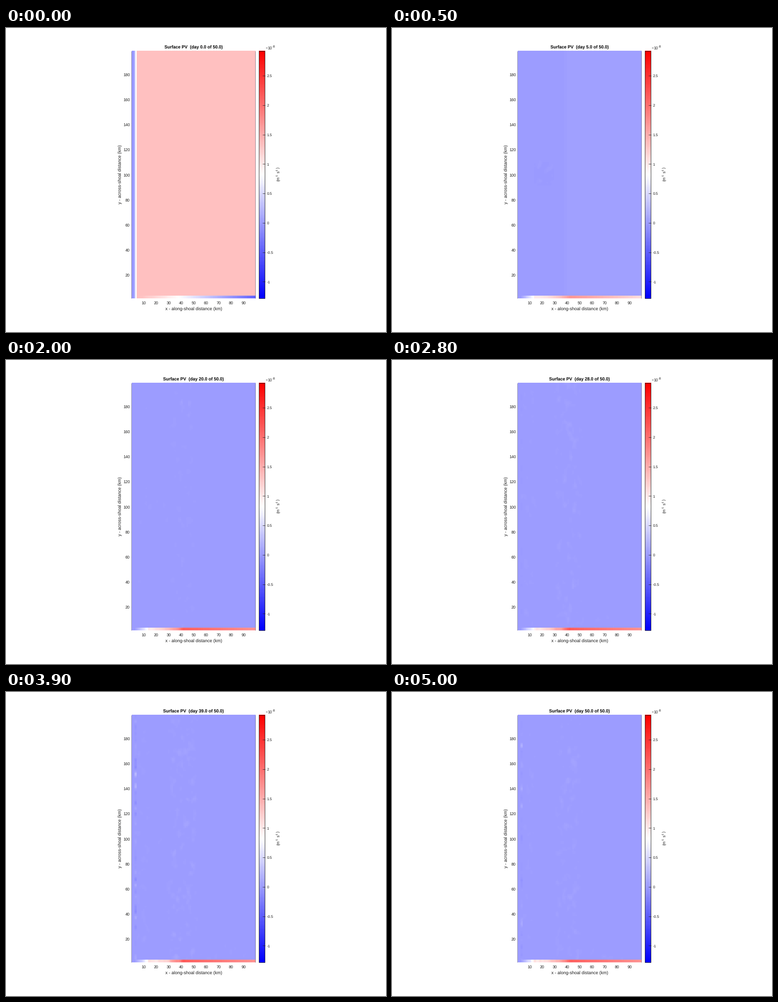
A matplotlib script for the animation above (5.1 s loop, 837 px wide and 669 px high).

```python
import numpy as np
import matplotlib.pyplot as plt
from matplotlib.animation import FuncAnimation
from matplotlib.colors import LinearSegmentedColormap
from matplotlib.patches import Rectangle

WIDTH, HEIGHT, DPI = 837, 669, 64
PX = 72 / DPI  # points per pixel
DAYS = 50
LEFT, RIGHT, TOP, BOTTOM = 277, 549.5, 50.5, 595
BAR_LEFT, BAR_RIGHT = 557, 571
VMIN, VMAX = -1.282, 2.921
NX, NY = 99, 198
INK = "#1c1c1c"

plt.rcParams["font.family"] = "Liberation Sans"
plt.rcParams["text.hinting"] = "none"

# Cell centres in km; row 0 is the top of the map.
x = np.arange(NX) + 1.0
y = np.arange(NY)[::-1] + 1.8
X, Y = np.meshgrid(x, y)


def smooth(a, axis, times):
    for _ in range(times):
        a = (np.roll(a, 1, axis) + 2 * a + np.roll(a, -1, axis)) / 4
    return a


rng = np.random.default_rng(7)
EDDY_STEP = 3
eddies = rng.standard_normal((DAYS // EDDY_STEP + 2, NY, NX))
eddies = smooth(smooth(eddies, 1, 5), 2, 2)
eddies /= eddies.std()


def ramp(value, start, end):
    return np.clip((value - start) / (end - start), 0, 1)


def blob(cx, cy, rx, ry):
    return np.exp(-(((X - cx) / rx) ** 2 + ((Y - cy) / ry) ** 2) ** 2)


def box(cx, cy, rx, ry):
    return np.exp(-((X - cx) / rx) ** 8 - ((Y - cy) / ry) ** 8)


def band(cx, half):
    return np.exp(-((X - cx) / half) ** 4)


def eddy_field(day):
    i, rest = divmod(day, EDDY_STEP)
    mix = rest / EDDY_STEP
    return (1 - mix) * eddies[i] + mix * eddies[i + 1]


def eddy_reach(day):
    """Where eddies show: island and boundary patches that spread into bands."""
    grow = ramp(day, 2, 12)
    late = ramp(day, 13, 25)
    island = blob(21.5, 101, 8 + 6 * grow, 9 + 6 * grow) * ramp(day, 2, 5)
    ends = blob(44, 188, 11, 9 + 30 * late) + blob(42, 14, 6, 12 + 30 * late)
    reach = island * (1 - 0.8 * late) + ends * ramp(day, 5, 12) * (1 - late)
    reach += late * (band(41, 11) + 0.5 * band(9, 6))
    reach += ramp(day, 18, 28) * (0.6 * blob(72, 4, 25, 10) + 0.12 * band(78, 12))
    return reach


def southern_strip(day):
    if day == 0:
        return 1.35 - 0.53 * (np.maximum(x - 4, 0) / 34) ** 1.2
    early = 0.95 - 1.15 * ramp(x, 14, 98) ** 1.5
    late = 1 + 1.1 * ramp(x, 14, 42) ** 2 - 0.4 * ramp(x, 45, 100)
    mix = 1 - np.exp(-(day - 1) / 3.5)
    inflow = 0.82 * ramp(x, 3, 13)
    return np.where(x < 13.5, inflow, early + mix * (late - early))


def first_day():
    z = np.full((NY, NX), 1.33)
    z[-2:] = southern_strip(0)
    z[:, :4] = np.maximum(-0.05, 0.4 * (x[:4] - 2))
    return z


def field(day):
    if day == 0:
        return first_day()
    age = day - 1
    shift = min(age, 4)
    noise = eddy_field(day)

    profile = np.interp(X, [13 + 6 * shift, 13.6 + 6 * shift, 28 + 2.75 * shift, 44],
                        [0, 0.25, 0.65, 1])
    z = 0.2 * np.exp(-0.36 * age) * profile
    z -= np.exp(-age / 1.2) * (0.07 * box(21, 101, 8.3, 10) + 0.03 * box(26, 101, 3, 7))
    z += 0.028 * np.maximum(noise, 0) * eddy_reach(day)

    coast = noise[:, 2:3]
    z[:, 2:4] += 0.035 * ramp(day, 26, 38) * coast * abs(coast)

    ripple = 0.06 * ramp(day, 12, 28) * ramp(x, 6, 12) * ramp(x, 48, 42)
    z[-2:] = southern_strip(day) + ripple * noise[-2]
    return z


fig = plt.figure(figsize=(WIDTH / DPI, HEIGHT / DPI), dpi=DPI, facecolor="white")
ax = fig.add_axes([0, 0, 1, 1])
ax.axis("off")
cmap = LinearSegmentedColormap.from_list("pv", ["blue", "white", "red"], N=256)


def label(px, py, text, size, **kw):
    kw = {"color": INK, "va": "baseline", **kw}
    return ax.text(px, py, text, fontsize=size * PX, **kw)


def upright(px, py, text, size, **kw):
    return label(px, py, text, size, rotation=90, rotation_mode="anchor", **kw)


def line(xs, ys, color, width):
    ax.plot(xs, ys, color=color, lw=width * PX, solid_capstyle="butt")


def show(data, x0, x1):
    return ax.imshow(data, cmap=cmap, vmin=VMIN, vmax=VMAX, aspect="auto",
                     interpolation="nearest", extent=(x0, x1, BOTTOM, TOP))


image = show(field(0), LEFT, RIGHT)
show(np.linspace(VMAX, VMIN, 545)[:, None], BAR_LEFT, BAR_RIGHT)
ax.set_xlim(0, WIDTH)
ax.set_ylim(HEIGHT, 0)

for edge in (LEFT - 0.5, RIGHT):
    line([edge, edge], [TOP, BOTTOM], "#55556a", 0.6)
ax.add_patch(Rectangle((BAR_LEFT + 0.5, TOP), BAR_RIGHT - BAR_LEFT - 1,
                       BOTTOM - TOP - 0.5, fill=False, ec=INK, lw=0.9 * PX))

for i in range(9):
    label(303 + 27.55 * i, 607.5, str(10 * (i + 1)), 8.9, ha="center")
    label(272.8, 547 - 55.12 * i, str(20 * (i + 1)), 8.9, ha="right")

for value in np.arange(-1, 3, 0.5):
    py = TOP + (VMAX - value) / (VMAX - VMIN) * (BOTTOM - TOP)
    line([BAR_RIGHT - 5.5, BAR_RIGHT], [py, py], INK, 0.8)
    label(574.3, py + 3.2, f"{value:g}", 8.3)

label(571.5, 47, "×", 8.6, color="#777777")
label(576.5, 47, "10", 8.6)
label(586.3, 43, "-8", 6.8)

upright(602.5, 337, "(m", 8.6)
upright(602.5, 319.3, "s", 8.6)
upright(602.5, 309.3, ")", 8.6)
for py in (326.8, 314.8):
    upright(599, py, "-1", 6)

label(413.3, 620.5, "x - along-shoal distance (km)", 9.7, ha="center")
upright(253.5, 322, "y - across-shoal distance (km)", 9.7, ha="center")
title = label(413, 45, "", 9.6, ha="center", color="black", weight="bold")


def update(day):
    image.set_data(field(day))
    title.set_text(f"Surface PV  (day {day:.1f} of {DAYS:.1f})")
    return image, title


anim = FuncAnimation(fig, update, frames=DAYS + 1, interval=100,
                     repeat=True, repeat_delay=0)
plt.show()
```
